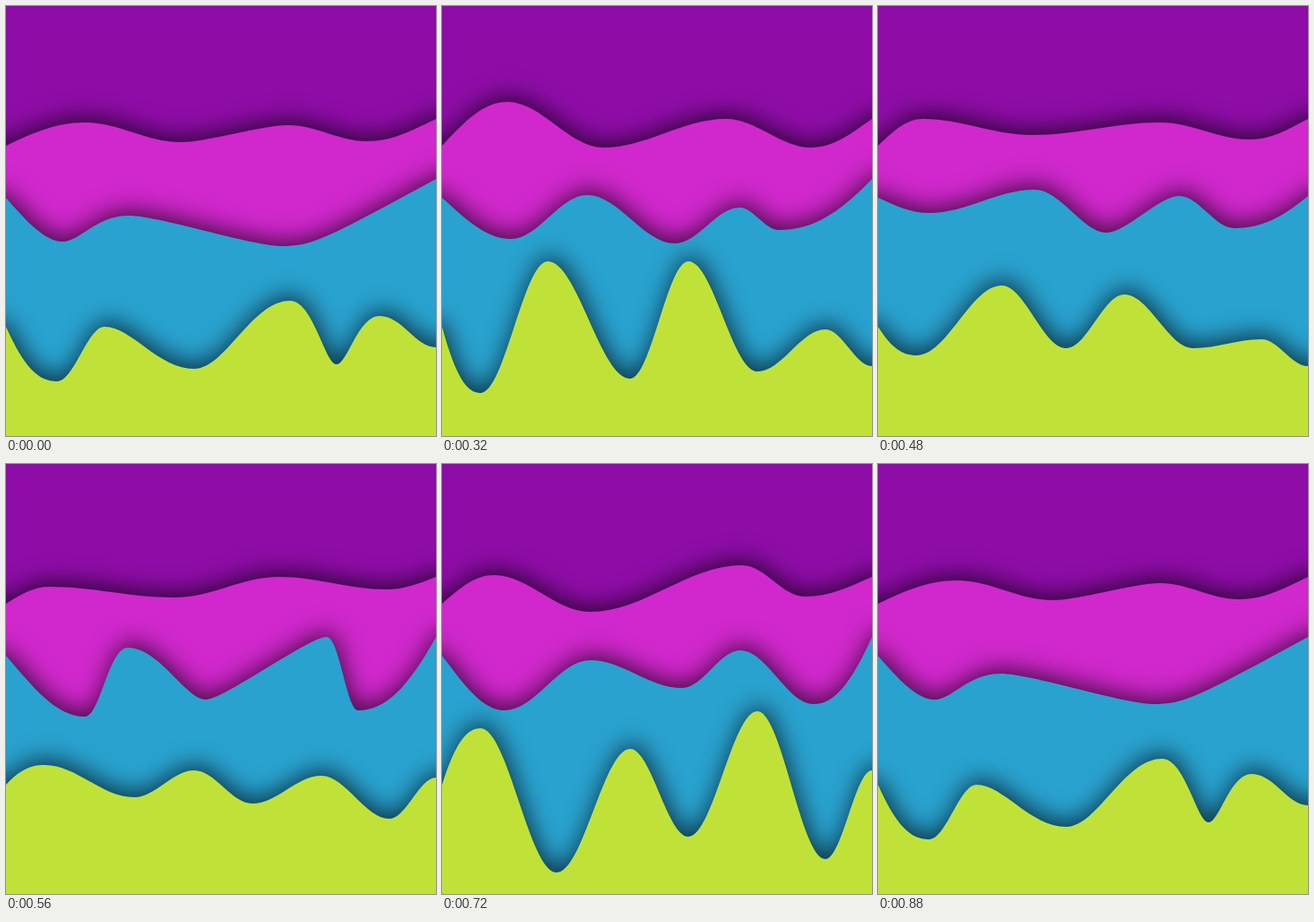
These frames come from a looping animation (480x480 px, 0.96 s). An HTML page with a canvas:

```html
<!DOCTYPE html>
<html>
<head>
<meta charset="utf-8">
<style>
  html, body { margin: 0; height: 100%; overflow: hidden; background: #8e0da7; }
  canvas { display: block; }
</style>
</head>
<body>
<canvas id="stage" width="480" height="480"></canvas>
<script>
const ctx = document.getElementById('stage').getContext('2d');
const SIZE = 480, TICK = 80, TICKS = 12;
const EASE = 0.36; // default handle length, as a share of the segment width
const KEY_TICKS = [0, 2, 4, 6, 7, 9, 11];

// Adds the edge knots; their slopes follow from the neighbouring chords.
// Inner knot: [x, y, left handle, right handle, slope].
function pose(startY, endY, startSteep, endSteep, inner) {
  const knots = inner.map(([x, y, left = EASE, right = EASE, slope = 0]) => [x, y, left, right, slope]);
  const first = knots[0], last = knots[knots.length - 1];
  const startSlope = startSteep * (first[1] - startY) / first[0];
  const endSlope = (last[4] ? 1 : endSteep) * (endY - last[1]) / (SIZE - last[0]);
  return [[0, startY, EASE, EASE, startSlope], ...knots, [SIZE, endY, EASE, EASE, endSlope]];
}

const pinkPose = (...inner) => pose(156, 126, 1.6, 1.5, inner);
const bluePose = (endY, ...inner) => pose(214, endY, 1.5, 1.9, inner);
const greenPose = (endY, ...inner) => pose(358, endY, 2.1, 0, inner);
// The green waves mostly rise and fall in place; only the second knot drifts.
const greenWave = (drift, endY, ...ys) =>
  greenPose(endY, ...[43, drift, 210, 275, 352, 428].map((x, i) => [x, ys[i]]));

const pink = [
  pinkPose([88, 130], [195, 152, .36, .25], [315, 133, .25], [403, 151]),
  pinkPose([95, 114], [192, 158], [315, 117], [410, 158]),
  pinkPose([73, 107], [180, 158], [317, 126], [412, 158]),
  pinkPose([50, 126], [172, 144], [315, 130], [415, 149]),
  pinkPose([48, 137], [188, 149], [305, 126], [425, 140]),
  pinkPose([58, 124], [165, 165], [335, 113], [405, 148])
];
const blue = [
  bluePose(193, [63, 263, .3, .27], [137, 234, .5, .2], [308, 268, .2], [350, 260, .36, .36, -.4], [400, 236, .36, .36, -.52]),
  bluePose(193, [78, 281, .25, .25], [159, 219, .2, .2], [259, 265], [340, 233, .36, .5], [374, 250]),
  bluePose(193, [77, 260], [162, 211], [260, 265], [332, 225], [376, 250]),
  bluePose(212, [57, 231], [175, 205], [255, 253, .33, .27], [336, 212, .27], [398, 248]),
  bluePose(193, [88, 282], [136, 205, .45, .4], [223, 263, .25, .15], [358, 193, .15, .4], [393, 275]),
  bluePose(193, [70, 275], [165, 219], [268, 250], [333, 208], [415, 268])
];
const green = [
  greenPose(381, [57, 419], [110, 358, .36, .3], [210, 405, .4, .33], [317, 329, .4, .5], [369, 400, .25, .25], [417, 346, .5, .4]),
  greenWave(95, 402, 419, 305, 410, 285, 408, 361),
  greenWave(118, 402, 432, 285, 416, 285, 408, 361),
  greenWave(138, 402, 390, 312, 382, 322, 382, 372),
  greenWave(143, 350, 336, 372, 342, 379, 348, 396),
  greenWave(128, 342, 295, 456, 318, 416, 276, 441)
];
const layers = [[pink, '#d028cc'], [blue, '#29a2cf'], [green, '#c0e238']];

const blend = (from, to, t) =>
  from.map((knot, i) => knot.map((v, j) => v + (to[i][j] - v) * t));

function drawLayer(knots, color) {
  const margin = 60;
  ctx.beginPath();
  ctx.moveTo(-margin, SIZE + margin);
  ctx.lineTo(-margin, knots[0][1]);
  ctx.lineTo(0, knots[0][1]);
  for (let i = 1; i < knots.length; i++) {
    const [x0, y0, , right, slope0] = knots[i - 1];
    const [x1, y1, left, , slope1] = knots[i];
    const dx0 = (x1 - x0) * right, dx1 = (x1 - x0) * left;
    ctx.bezierCurveTo(x0 + dx0, y0 + slope0 * dx0, x1 - dx1, y1 - slope1 * dx1, x1, y1);
  }
  ctx.lineTo(SIZE + margin, knots[knots.length - 1][1]);
  ctx.lineTo(SIZE + margin, SIZE + margin);
  ctx.fillStyle = color;
  ctx.fill();
}

function draw(now) {
  const tick = Math.floor(now / TICK) % TICKS;
  const key = Math.max(0, KEY_TICKS.findLastIndex(k => k <= tick));
  const start = KEY_TICKS[key], end = KEY_TICKS[key + 1] ?? TICKS;
  const t = (tick - start) / (end - start);

  ctx.shadowColor = 'transparent';
  ctx.fillStyle = '#8e0da7';
  ctx.fillRect(0, 0, SIZE, SIZE);
  ctx.shadowColor = 'rgba(0, 0, 0, .65)';
  ctx.shadowBlur = 26;
  ctx.shadowOffsetX = 2;
  ctx.shadowOffsetY = -6;
  for (const [poses, color] of layers) {
    const at = i => poses[i % poses.length];
    drawLayer(blend(at(key), at(key + 1), t), color);
  }
}

function loop(now) {
  draw(now);
  requestAnimationFrame(loop);
}
draw(0);
requestAnimationFrame(loop);
</script>
</body>
</html>
```
